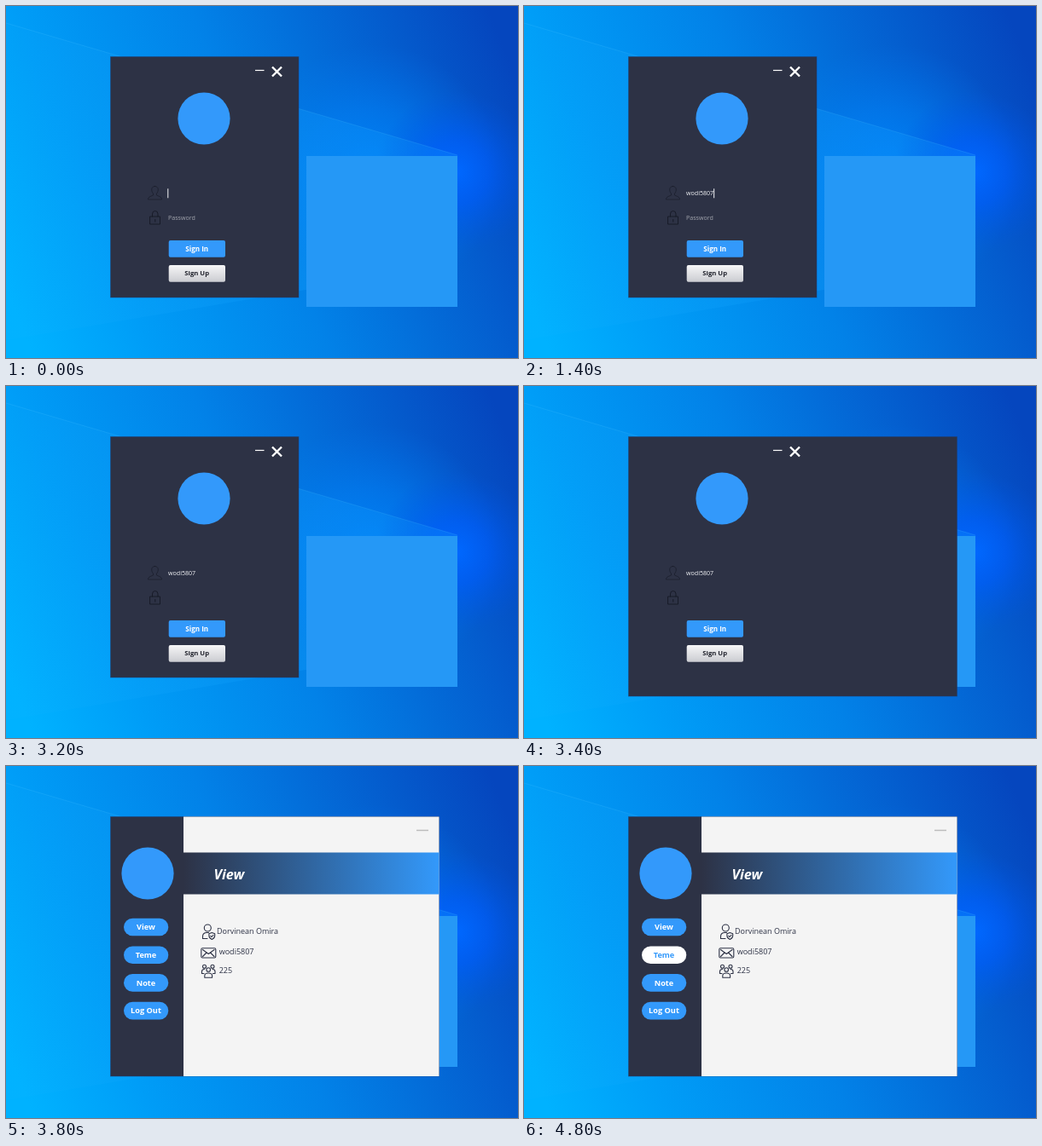
These frames come from a looping animation (600 px wide and 413 px high, 5000 ms). An HTML page:

```html
<!DOCTYPE html>
<html lang="en">
<head>
<meta charset="utf-8">
<title>Sign in</title>
<style>
  html, body { margin: 0; width: 100%; height: 100%; overflow: hidden; background: #0675e0; }
  svg { display: block; width: 100vw; height: 100vh; }
  text { font-family: "Open Sans", "Noto Sans", sans-serif; white-space: pre; }
  .small { font-size: 7.1px; fill: #f2f3f6; }
  .hint { fill: #a3a6af; }
  .info { font-size: 9px; fill: #2d3245; }
  .btn { font-weight: 700; text-anchor: middle; }
  .nav { font-size: 9.2px; fill: #fff; }
  .nav rect { fill: #3399fb; }
  .hover { fill: #3399fb; }
  .hover rect { fill: #fff; }
  .icon { fill: none; stroke: #2d3245; stroke-width: 1.1; stroke-linejoin: round; stroke-linecap: round; }
  .dark { stroke: #161925; stroke-width: .9; }
  .faint { stroke-opacity: .65; }
</style>
</head>
<body>
<svg viewBox="0 0 600 413" preserveAspectRatio="none">
  <defs>
    <linearGradient id="sky" gradientUnits="userSpaceOnUse" x1="0" y1="330" x2="600" y2="90">
      <stop offset="0" stop-color="#00b2ff"/>
      <stop offset=".2" stop-color="#009df7"/>
      <stop offset=".5" stop-color="#0282e8"/>
      <stop offset="1" stop-color="#0546be"/>
    </linearGradient>
    <radialGradient id="halo" gradientUnits="userSpaceOnUse" cx="430" cy="195" r="150">
      <stop offset="0" stop-color="#0088ff" stop-opacity=".8"/>
      <stop offset=".5" stop-color="#0084fc" stop-opacity=".45"/>
      <stop offset="1" stop-color="#0078f0" stop-opacity="0"/>
    </radialGradient>
    <radialGradient id="glow" gradientUnits="userSpaceOnUse" cx="528" cy="195" r="95">
      <stop offset="0" stop-color="#0068ff"/>
      <stop offset=".4" stop-color="#005cf8" stop-opacity=".7"/>
      <stop offset="1" stop-color="#0054e0" stop-opacity="0"/>
    </radialGradient>
    <linearGradient id="beam" gradientUnits="userSpaceOnUse" x1="0" y1="0" x2="529" y2="0">
      <stop offset="0" stop-color="#20b4ff" stop-opacity=".05"/>
      <stop offset=".65" stop-color="#10a0ff" stop-opacity=".28"/>
      <stop offset="1" stop-color="#109cff" stop-opacity=".25"/>
    </linearGradient>
    <linearGradient id="banner">
      <stop offset="0" stop-color="#2d3245"/>
      <stop offset="1" stop-color="#3399fb"/>
    </linearGradient>
    <linearGradient id="silver" x2="0" y2="1">
      <stop offset="0" stop-color="#f6f6f7"/>
      <stop offset="1" stop-color="#cbccd1"/>
    </linearGradient>
  </defs>

  <rect width="600" height="413" fill="url(#sky)"/>
  <rect width="600" height="413" fill="url(#halo)"/>
  <rect width="600" height="413" fill="url(#glow)"/>
  <path d="M0 20L529 175V303L0 392Z" fill="url(#beam)"/>
  <path d="M0 20L529 175" stroke="#4cc0ff" stroke-opacity=".2" fill="none"/>
  <rect x="352" y="176" width="177" height="177" fill="#2598f6"/>

  <rect id="panel" x="122.5" y="59.5" width="220.5" height="282.5"
        fill="#2d3245" stroke="#1c3f78" stroke-opacity=".5"/>

  <g id="login">
    <path d="M292 75.5H302.5" stroke="#fff" stroke-width="1.2"/>
    <path d="M312 71.5L323 82.500M323 71.5L312 82.5" stroke="#fff" stroke-width="2.4"/>
    <circle cx="232" cy="132" r="30.6" fill="#3399fb"/>
    <path class="icon dark faint" d="M174.5 211.5c-5 0-4.5 6-2 8.5v2l-4.5 2q-1.5 1-1.5 3H182.5q0-2-1.5-3l-4.5-2v-2c2.5-2.5 3-8.5-2-8.5Z"/>
    <path class="icon dark" d="M169 247h11.5v9H169ZM171.5 247v-3q0-3.5 3.250-3.5t3.250 3.5v3M174.750 250.5v2.5"/>
    <text id="user" class="small" x="190" y="222.3"></text>
    <text id="hint" class="small hint" x="190" y="250.8">Password</text>
    <rect id="caret" width="1" height="11" fill="#f2f3f6"/>
    <rect x="190.7" y="275" width="66.3" height="19.7" rx="2" fill="#3399fb"/>
    <text class="btn" x="223.7" y="287.9" font-size="8.1" fill="#fff">Sign In</text>
    <rect x="190.7" y="304" width="66.3" height="19.7" rx="2" fill="url(#silver)"/>
    <text class="btn" x="223.7" y="316.3" font-size="7.7" fill="#20222c">Sign Up</text>
  </g>

  <g id="home">
    <rect x="208" y="59.5" width="299.5" height="304.5" fill="#f4f4f4"/>
    <rect x="208" y="101.5" width="299.5" height="49" fill="url(#banner)"/>
    <path d="M481 75.5H495" stroke="#bcbcbc" stroke-width="1.5"/>
    <text x="243.5" y="133" font-size="16.2" font-weight="700" font-style="italic" fill="#fff">View</text>
    <circle cx="166" cy="126" r="30.6" fill="#3399fb"/>
    <g id="menu"></g>

    <g class="icon">
      <circle cx="236.3" cy="190" r="4"/>
      <path d="M236 202.5H230.5v-2.5q0-4 4-4.5h3"/>
      <path d="M241.3 195.5l3.4 1.2v2.3q0 3-3.4 4.5q-3.4-1.5-3.4-4.5v-2.3ZM239.8 199.3l1.2 1.2l2-2.2"/>
      <rect x="228.8" y="213.8" width="17" height="11.2" rx="1.5"/>
      <path d="M230.5 215.5l6.8 5l6.8-5M230.5 223.5l4-4M244 223.5l-4-4"/>
    </g>
    <g class="icon">
      <circle cx="232.5" cy="235.2" r="2"/>
      <circle cx="242" cy="235.2" r="2"/>
      <circle cx="237.2" cy="239" r="2.3"/>
      <path d="M229.5 243.5v-2.5q0-2.5 3-2.5M245 243.5v-2.5q0-2.5-3-2.5M229.5 243.5h2.5M245 243.5h-2.5M232.8 248.3v-2.3q0-3 4.4-3t4.4 3v2.3Z"/>
    </g>
    <text class="info" x="247" y="196.5">Dorvinean Omira</text>
    <text class="info" x="249.7" y="221.3">wodi5807</text>
    <text class="info" x="249.7" y="242.6">225</text>
  </g>
</svg>
<script>
const LOOP = 5000, STEP = 200;
const NAME = "wodi5807";
const TYPED = [0, 1, 2, 3, 4, 6, 7, 8];       // letters shown per step
const TILT = [[4000, 10], [4200, 20], [4400, 0]]; // hovered button: [start, angle]

const $ = id => document.getElementById(id);
const show = (el, on) => el.setAttribute("display", on ? "inline" : "none");
const set = (el, attrs) => { for (const k in attrs) el.setAttribute(k, attrs[k]); };

$("menu").innerHTML = ["View", "Teme", "Note", "Log Out"].map((label, i) => {
  const y = 189 + i * 32.7;
  return `<g class="nav"><rect x="138" y="${y - 10.3}" width="52.3" height="20.6" rx="10.3"/>` +
         `<text class="btn" x="164" y="${y + 3.3}">${label}</text></g>`;
}).join("");
const teme = $("menu").children[1];

function drawLogin(t) {
  const count = TYPED[Math.min(t / STEP, TYPED.length - 1)];
  const inName = t < 1600;
  const user = $("user"), caret = $("caret");
  user.textContent = NAME.slice(0, count);
  show($("hint"), inName);
  show(caret, t < 2000 || (t >= 2600 && t < 3000));
  const x = inName && count ? 190 + user.getComputedTextLength() : 189.3;
  set(caret, { x, y: inName ? 214.3 : 242.8 });
}

function drawHome(t) {
  const tilt = TILT.filter(([start]) => t >= start).pop();
  set(teme, {
    class: tilt ? "nav hover" : "nav",
    transform: `rotate(${tilt ? tilt[1] : 0} 164.2 221.7)`
  });
}

function draw(t) {
  const home = t >= 3600, wide = t >= 3400;
  set($("panel"), { width: wide ? 385 : 220.5, height: wide ? 304.5 : 282.5 });
  show($("login"), !home);
  show($("home"), home);
  if (home) drawHome(t); else drawLogin(t);
}

const begin = performance.now();
let last = -1;
function tick() {
  const time = (performance.now() - begin) % LOOP;
  const t = Math.floor(time / STEP) * STEP;
  if (t !== last) draw(last = t);
  requestAnimationFrame(tick);
}
tick();
</script>
</body>
</html>
```
